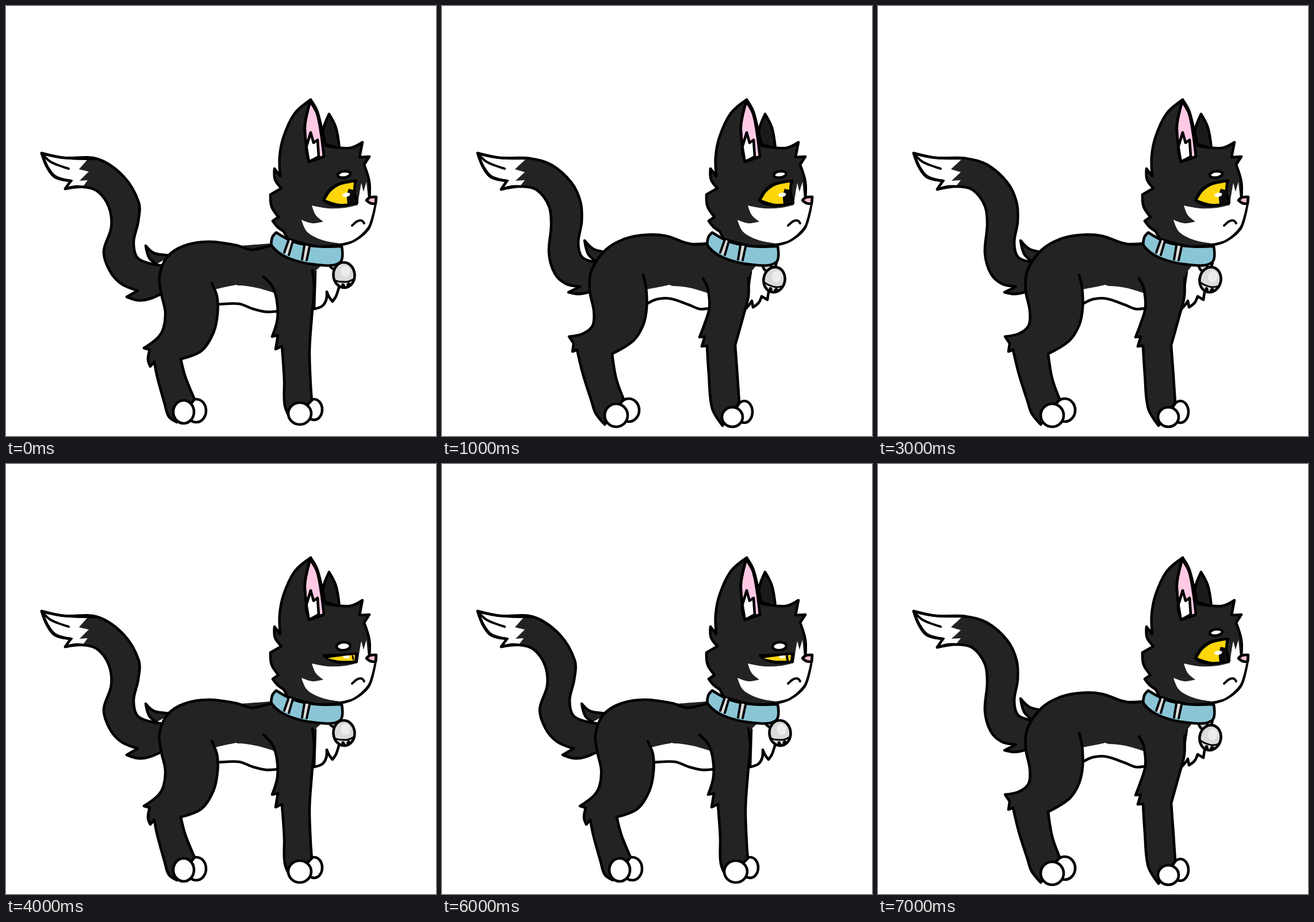
Write an HTML page that moves like this. It is 748 by 748 pixels and loops after 8.01 s.

```html
<!DOCTYPE html>
<html lang="en">
<head>
<meta charset="utf-8">
<title>Cat</title>
<style>
html, body { margin: 0; width: 100%; height: 100%; overflow: hidden; background: #fff; }
svg { display: block; width: 100vw; height: 100vh; }
path, ellipse { stroke: #000; stroke-width: 4.6; stroke-linecap: round; stroke-linejoin: round; }
</style>
</head>
<body>
<svg id="stage" viewBox="0 0 748 748"></svg>
<script>
const FUR = '#232323', WHITE = '#fff', GREY = '#dadada', PINK = '#ffc9e4', YELLOW = '#ffd60a';
const STEP = 1000, LOOP = 8010;

// Smooth curve through "x,y" points; a trailing * makes a sharp corner.
function curve(text, closed = false) {
  const pts = text.trim().split(/\s+/).map(t => {
    const [x, y] = t.replace('*', '').split(',').map(Number);
    return { x, y, sharp: t.endsWith('*') };
  });
  const n = pts.length;
  const at = i => closed ? pts[(i + n) % n] : pts[Math.max(0, Math.min(n - 1, i))];
  const handle = (i, sign) => {
    const p = at(i), a = at(i - 1), b = at(i + 1), near = at(i + sign);
    if (p.sharp) return `${p.x},${p.y}`;
    const span = Math.hypot(b.x - a.x, b.y - a.y) || 1;
    const k = sign * Math.hypot(near.x - p.x, near.y - p.y) / 3 / span;
    return `${(p.x + (b.x - a.x) * k).toFixed(1)},${(p.y + (b.y - a.y) * k).toFixed(1)}`;
  };
  let d = `M${pts[0].x},${pts[0].y}`;
  for (let i = 0; i < (closed ? n : n - 1); i++) {
    const end = at(i + 1);
    d += `C${handle(i, 1)} ${handle(i + 1, -1)} ${end.x},${end.y}`;
  }
  return d + (closed ? 'Z' : '');
}

const tag = (d, fill, extra = '') => `<path d="${d}" fill="${fill}" ${extra}/>`;
const shape = (pts, fill) => tag(curve(pts, true), fill);
const patch = (pts, fill) => tag(curve(pts, true), fill, 'style="stroke:none"');
const open = (pts, fill) => tag(curve(pts), fill);
const line = (pts, width = 4.6) => tag(curve(pts), 'none', `style="stroke-width:${width}"`);
const oval = (x, y, rx, ry, fill = WHITE, turn = 0) =>
  `<ellipse cx="${x}" cy="${y}" rx="${rx}" ry="${ry}" fill="${fill}" transform="rotate(${turn} ${x} ${y})"/>`;
const paw = ([x, y, rx, ry]) => oval(x, y, rx, ry);

function bell(x, y, turn) {
  return `<g transform="translate(${x} ${y}) rotate(${turn})">
    ${oval(-17, -20, 7, 9, GREY, -35)}
    ${oval(0, 0, 18.5, 22, GREY)}
    <ellipse cx="3" cy="-6" rx="8" ry="10" fill="#ececec" style="stroke:none"/>
    ${line('-17,8 -8,11 6,12 17,8', 3)}
    ${line('-4,19 -3,16 -1,20', 4)}${line('5,18 7,15 8,18', 4)}
  </g>`;
}

const body = p => [
  shape(p.tail, FUR),
  patch(p.tailTip, WHITE),
  line(p.tailTop), line(p.tailTuft), line('66,261 76,270 91,277 109,283', 4),
  open(p.rump, WHITE === p.rumpFill ? WHITE : FUR),
  open(p.chest, WHITE),
  patch(p.torso, FUR),
  patch(p.belly, WHITE),
  line(p.bellyLine),
  paw(p.paws[1]), paw(p.paws[3]),
  open(p.hind, FUR),
  open(p.fore, FUR),
  paw(p.paws[0]), paw(p.paws[2]),
  bell(...p.bell)
].join('');

const poses = [{
  tail: '62,256* 100,264 159,266 205,297 231,342 230,375 222,412 231,440 275,452* 270,501* 248,510 230,512 210,506* 229,495* 200,483 180,460 170,427 183,385 179,350 160,323 136,315 103,318* 113,304* 86,298 72,281',
  tailTip: '66,260* 100,266 141,268* 127,284* 144,288* 128,304* 142,303* 134,314* 107,315* 117,303* 88,295 75,280',
  tailTop: '62,256* 100,264 159,266',
  tailTuft: '136,315 122,314 103,318* 113,304* 86,298 72,281 62,256*',
  rump: '262,449* 249,438 243,417* 258,430 288,434',
  chest: '538,462* 536,527* 550,522 557,511 558,497* 562,506 568,514* 574,505 579,490* 584,446*',
  torso: '462,413* 550,430* 548,452* 537,462* 534,510* 472,510* 400,485* 362,495* 300,425*',
  belly: '364,493* 400,486 435,490 470,500* 474,530* 440,529 405,518 366,519*',
  bellyLine: '366,519 405,518 430,527 452,532 475,531',
  hind: '466,415 445,421 426,424 400,416 352,410 310,417 280,437 267,470 270,500 277,532 274,560 264,577 240,595* 250,598* 247,615 251,627* 258,619* 263,645 276,692 283,714 297,724* 328,684* 312,645 304,614* 340,600 361,568 368,535 367,505 358,482',
  fore: '448,471 463,487 471,512 472,545 463,575* 473,573* 469,597* 480,592* 484,650 485,695 497,722* 532,686* 530,660 528,600 532,540 536,490 533,460',
  paws: [[309, 706, 18, 20], [331, 704, 17, 20], [511, 709, 20, 19], [536, 702, 14, 18]],
  bell: [588, 468, -4]
}, {
  tail: '62,256* 100,264 152,265 190,276 225,307 241,341 243,375 237,412 244,437 270,446* 258,497* 238,501 220,498* 240,488* 215,483 196,465 186,430 190,380 186,348 165,320 138,314 103,319* 113,304* 86,298 72,281',
  tailTip: '66,260* 100,266 145,267* 127,284* 144,289* 128,304* 144,303* 136,313* 107,316* 117,303* 88,295 75,280',
  tailTop: '62,256* 100,264 152,265',
  tailTuft: '138,314 122,314 103,319* 113,304* 86,298 72,281 62,256*',
  rump: '266,443* 254,431 248,408* 264,423 289,429',
  chest: '537,462* 527,528* 535,519 539,513* 541,524* 551,516 556,505* 566,511* 568,498* 582,446*',
  torso: '462,411* 550,430* 546,452* 535,466* 530,510* 466,510* 395,485* 354,495* 290,418*',
  belly: '356,493* 394,487 430,490 464,500* 466,527* 430,519 392,509 356,518*',
  bellyLine: '356,518 374,510 397,509 430,520 448,527 465,526',
  hind: '466,412 445,415 424,412 390,400 355,398 318,405 285,424 260,460 257,495 264,530 262,556 245,570 221,575* 229,587* 227,601* 235,598* 245,640 260,687 267,708 283,728* 316,684* 303,648 296,605* 333,582 350,555 356,525 355,490 350,468',
  fore: '454,474 462,490 465,525 456,555 448,576* 457,575* 452,592* 461,591* 464,640 470,700 488,730* 517,690* 514,645 510,590* 524,540 533,505 533,473',
  paws: [[303, 712, 20, 20], [325, 703, 18, 20], [505, 715, 18, 17], [526, 706, 14, 19]],
  bell: [578, 476, 12]
}];

const head = [
  shape('548,238* 553,210 562,188* 574,212 580,248*', '#1a1a1a'),
  shape('530,163* 502,187 483,227 476,262 477,296* 467,283* 468,302 479,317* 460,328* 462,349 474,367* 464,374* 472,384 483,392* 490,405* 540,418 580,416 606,408 630,388 639,362 644,334* 632,336* 632,306 623,276* 632,262* 615,263* 620,237* 598,247 556,243* 549,212 541,182', FUR),
  patch('532,347* 560,352 590,351 612,346* 615,325 618,308* 622,323* 627,306* 630,335* 641,344* 636,366 628,386 604,407 581,413* 550,407 524,393 514,372* 533,378 552,375* 539,364', WHITE),
  shape('529,166* 520,207 522,240 527,271* 553,262* 548,222 541,187', PINK),
  shape('524,240* 530,220* 535,238* 542,233* 544,262* 527,271* 522,250', WHITE),
  line('553,262* 527,271* 522,240 520,207 530,163*'),
  shape('627,338* 633,333 644,332* 643,344* 634,343', '#f6bdd5'),
  line('602,382 610,375 616,373 620,374 623,378', 4),
  shape('470,394* 500,410 540,418 584,418* 581,446 540,450 490,438 463,418 463,403', '#8ac5d6'),
  patch('492,406* 500,410* 493,434* 484,430*', GREY),
  patch('518,416* 528,418* 524,442* 514,440*', GREY),
  line('492,406 484,429', 4), line('499,409 492,433', 4),
  line('519,417 515,441', 4), line('528,419 523,442', 4)
].join('');

const half = pupil => [
  oval(587, 317, 12, 7, WHITE, -4),
  shape('553,333* 580,332 611,330* 609,344* 580,345 563,340', '#101010'),
  patch('559,338* 580,335 607,332* 606,342* 580,342', YELLOW),
  patch('586,334* 597,333* 597,338* 588,338*', WHITE),
  pupil
].join('');

const eyes = {
  open: [
    oval(588, 293, 11, 5.5, WHITE, -8),
    shape('552,338* 562,321 580,309 609,304* 606,320 611,342* 582,347 565,345', '#0b0b0b'),
    patch('556,337* 565,323 581,312 605,307* 604,324 606,342* 580,344', YELLOW),
    patch('596,318* 605,320* 606,343* 594,344* 593,330', '#0b0b0b'),
    patch('585,329 591,325 598,326 597,330 590,332', WHITE)
  ].join(''),
  narrow: half(line('603,334 604,340', 2.5)),
  squint: half(line('600,334 601,341', 4)),
  shut: oval(587, 319, 13, 8) + line('556,339 580,340 609,337')
};

const layer = (name, art) => `<g id="${name}">${art}</g>`;
const stage = document.getElementById('stage');
stage.innerHTML = poses.map((p, i) => layer('pose' + i, body(p))).join('') + head +
  Object.entries(eyes).map(([name, art]) => layer(name, art)).join('');

const timeline = [
  ['pose0', 'open'], ['pose1', 'open'], ['pose0', 'open'], ['pose1', 'open'],
  ['pose0', 'narrow'], ['pose1', 'shut'], ['pose0', 'squint'], ['pose1', 'open']
];

for (const group of stage.querySelectorAll('g[id]')) {
  const keys = timeline.map((shown, i) => ({
    offset: i * STEP / LOOP,
    opacity: shown.includes(group.id) ? 1 : 0,
    easing: 'step-end'
  }));
  keys.push({ ...keys[keys.length - 1], offset: 1 });
  group.animate(keys, { duration: LOOP, iterations: Infinity });
}
</script>
</body>
</html>
```
